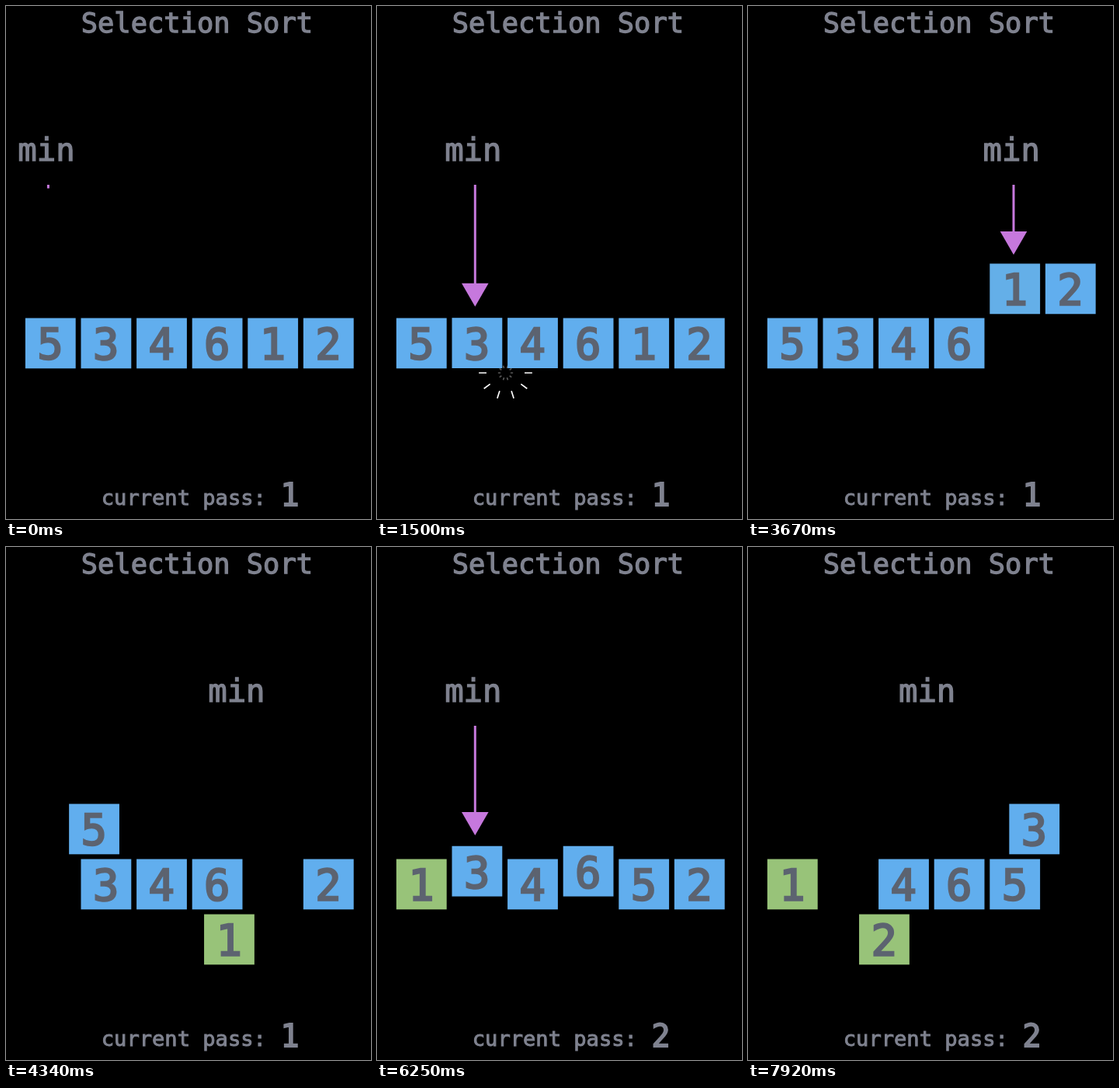
Animation of 470x660 px, one loop 8000 ms. Source, as an HTML page:

```html
<!DOCTYPE html>
<html lang="en">
<head>
<meta charset="utf-8">
<title>Selection Sort</title>
<style>
  html, body { margin: 0; width: 100%; height: 100%; overflow: hidden; background: #000; }
  svg { display: block; width: 100vw; height: 100vh; }
  text { font-family: "DejaVu Sans Mono", monospace; fill: #7f828f; stroke: #7f828f; stroke-width: 1.3; }
  .mid { text-anchor: middle; }
  .digit { font-size: 55.5px; fill: #5c6370; stroke: #5c6370; stroke-width: 2.4; text-anchor: middle; }
</style>
</head>
<body>
<svg id="stage" viewBox="0 0 470 660">
  <rect width="470" height="660"/>
  <text class="mid" x="245.9" y="33.8" font-size="35.4">Selection Sort</text>
  <text class="mid" id="min" y="199" font-size="40.6">min</text>
  <text x="122.8" y="642" font-size="27.1" style="stroke-width:1">current pass:</text>
  <text class="mid" id="pass" x="365.5" y="642.5" font-size="40" style="stroke-width:1.8">1</text>
  <g id="wires" fill="none" stroke="#777" stroke-width="1.6" stroke-dasharray="14 999"></g>
  <path id="rays" stroke="#fff" stroke-width="1.7"/>
  <path id="core" stroke="#999" stroke-width="1.7"/>
  <g id="boxes"></g>
  <g id="arrow" fill="#c678dd"><rect id="shaft" x="-1.5" y="230" width="3"/><path id="head"/></g>
</svg>
<script>
const LOOP = 8000, STEP = 71.6, LIFT = 71;
// Phases of one comparison, in ms at normal speed
const RISE = 180, WIRE = 185, FALL = 195, BURST_AT = 395, BURST = 360;
const FAST = 0.55;

const $ = id => document.getElementById(id);
const add = (parent, tag, attrs) => {
  const el = document.createElementNS("http://www.w3.org/2000/svg", tag);
  set(el, attrs);
  return parent.appendChild(el);
};
function set(el, attrs) { for (const k in attrs) el.setAttribute(k, attrs[k]); }

const clamp = x => Math.max(0, Math.min(1, x));
const lin = (t, from, to) => clamp((t - from) / (to - from));
const smooth = x => x < 0.5 ? 2 * x * x : 1 - 2 * (1 - x) * (1 - x);
const ease = (t, from, to) => smooth(lin(t, from, to));
const easeOut = x => 1 - (1 - clamp(x)) ** 3;
const mix = (a, b, p) => a + (b - a) * p;
const centre = slot => 57.3 + STEP * slot;

const compare = (at, a, b, k = 1) => ({ at, a, b, k });
const compares = [
  compare(140, 0, 1), compare(950, 1, 2), compare(1710, 1, 3), compare(2480, 1, 4), compare(3290, 4, 5),
  compare(5797, 1, 2, FAST), compare(6217, 1, 3, FAST), compare(6637, 1, 4, FAST), compare(7057, 1, 5, FAST)
];
const swaps = [
  { a: 0, b: 4, split: 3950, apart: 4150, go: 4200, there: 4650, home: 4800 },
  { a: 1, b: 5, split: 7500, apart: 7590, go: 7600, there: 8049, home: 8200 }
];
// Arrow shrinks, the label slides, the arrow grows back
const hop = (at, from, to, k = 1) =>
  ({ from, to, hide: at, go: at + 60 * k, there: at + 180 * k, show: at + 180 * k, done: at + 250 * k });
const hops = [
  hop(700, 0, 1), hop(3040, 1, 4),
  { from: 4, to: 1, hide: 3850, go: 4200, there: 4650, show: 4700, done: 4960 },
  hop(7364, 1, 5, FAST),
  { from: 5, to: 2, hide: 7500, go: 7600, there: 8049, show: 8100, done: 8300 }
];
const greenAt = { 1: [3655, 3950], 2: [7330, 7500] };

const boxes = [5, 3, 4, 6, 1, 2].map((value, slot) => {
  const g = add($("boxes"), "g", {});
  const rect = add(g, "rect", { x: -32.4, y: 401.5, width: 64.8, height: 64.8 });
  add(g, "text", { class: "digit", x: -0.3, y: 454.4 }).textContent = value;
  return { value, slot, g, rect };
});
const wires = [0, 1].map(() => add($("wires"), "path", {}));

function lift(t, slot) {
  let up = 0;
  for (const { at, a, b, k } of compares) {
    if (slot !== a && slot !== b) continue;
    const p = (t - at) / k;
    up += LIFT * (ease(p, 0, RISE) - ease(p, RISE + WIRE, RISE + WIRE + FALL));
  }
  return up;
}

function drawBox(box, t) {
  let slot = box.slot, x = centre(slot), dy = 0;
  for (const s of swaps) {
    if (t < s.split || (slot !== s.a && slot !== s.b)) continue;
    const other = slot === s.a ? s.b : s.a;
    const side = slot === s.a ? -1 : 1;
    x = mix(centre(slot), centre(other), ease(t, s.go, s.there));
    dy += side * LIFT * (ease(t, s.split, s.apart) - ease(t, s.there, s.home));
    if (t >= s.home) slot = other;
  }
  dy -= lift(t, slot);
  const span = greenAt[box.value];
  const p = span ? lin(t, ...span) : 0;
  const rgb = [[97, 174, 238], [152, 195, 121]];
  set(box.g, { transform: `translate(${x} ${dy})` });
  set(box.rect, { fill: `rgb(${rgb[0].map((c, i) => Math.round(mix(c, rgb[1][i], p)))})` });
}

function drawPointer(t) {
  let slot = 0, grown = lin(t, -3, 140);
  for (const h of hops) {
    if (t < h.hide) break;
    slot = mix(h.from, h.to, ease(t, h.go, h.there));
    grown = 1 - ease(t, h.hide, Math.min(h.go, h.hide + 100)) + ease(t, h.show, h.done);
  }
  set($("min"), { x: 52 + 71.8 * slot });
  const up = Number.isInteger(slot) ? lift(t, slot) * 0.955 : 0;
  const tip = 230 + (157 - up) * grown, top = tip - 30 * grown, w = 17.3 * grown;
  set($("arrow"), { transform: `translate(${54.4 + 71.9 * slot} 0)`, visibility: grown > 0 ? "visible" : "hidden" });
  set($("shaft"), { height: Math.max(0, top - 230) + 1 });
  set($("head"), { d: `M${-w} ${top}H${w}L0 ${tip}Z` });
}

function burstPath(x, inner, outer) {
  let d = "";
  for (let i = 0; i < 10; i++) {
    const c = Math.cos(i * Math.PI / 5), s = Math.sin(i * Math.PI / 5);
    d += `M${x + c * inner} ${472 + s * inner}L${x + c * outer} ${472 + s * outer}`;
  }
  return d;
}

function drawSparks(t) {
  const now = compares.filter(c => c.at <= t).pop();
  const p = now ? (t - now.at) / now.k : -1;
  const u = (p - RISE) / WIRE, q = (p - BURST_AT) / BURST;
  const wired = u > 0 && u < 1, lit = q > 0 && q < 1;
  set($("wires"), { visibility: wired ? "visible" : "hidden" });
  for (const id of ["rays", "core"]) set($(id), { visibility: lit ? "visible" : "hidden" });
  if (!now) return;
  const mid = (centre(now.a) + centre(now.b)) / 2;
  if (wired) [now.a, now.b].forEach((slot, i) => {
    const x = centre(slot), length = 57 + Math.abs(mid - x);
    set(wires[i], { d: `M${x} 415V472H${mid}`, "stroke-dashoffset": 14 - u * (length + 14) });
  });
  if (lit) {
    const r = lag => 42 * easeOut(q - lag);
    set($("rays"), { d: burstPath(mid + 0.8, r(0.18), r(0)) });
    set($("core"), { d: burstPath(mid + 0.8, r(0.38), r(0.35)), opacity: 1 - q });
  }
}

function render(t) {
  boxes.forEach(box => drawBox(box, t));
  drawPointer(t);
  drawSparks(t);
  $("pass").textContent = t < 5250 ? 1 : 2;
}

const start = performance.now();
function tick() {
  render((performance.now() - start) % LOOP);
  requestAnimationFrame(tick);
}
tick();
</script>
</body>
</html>
```
